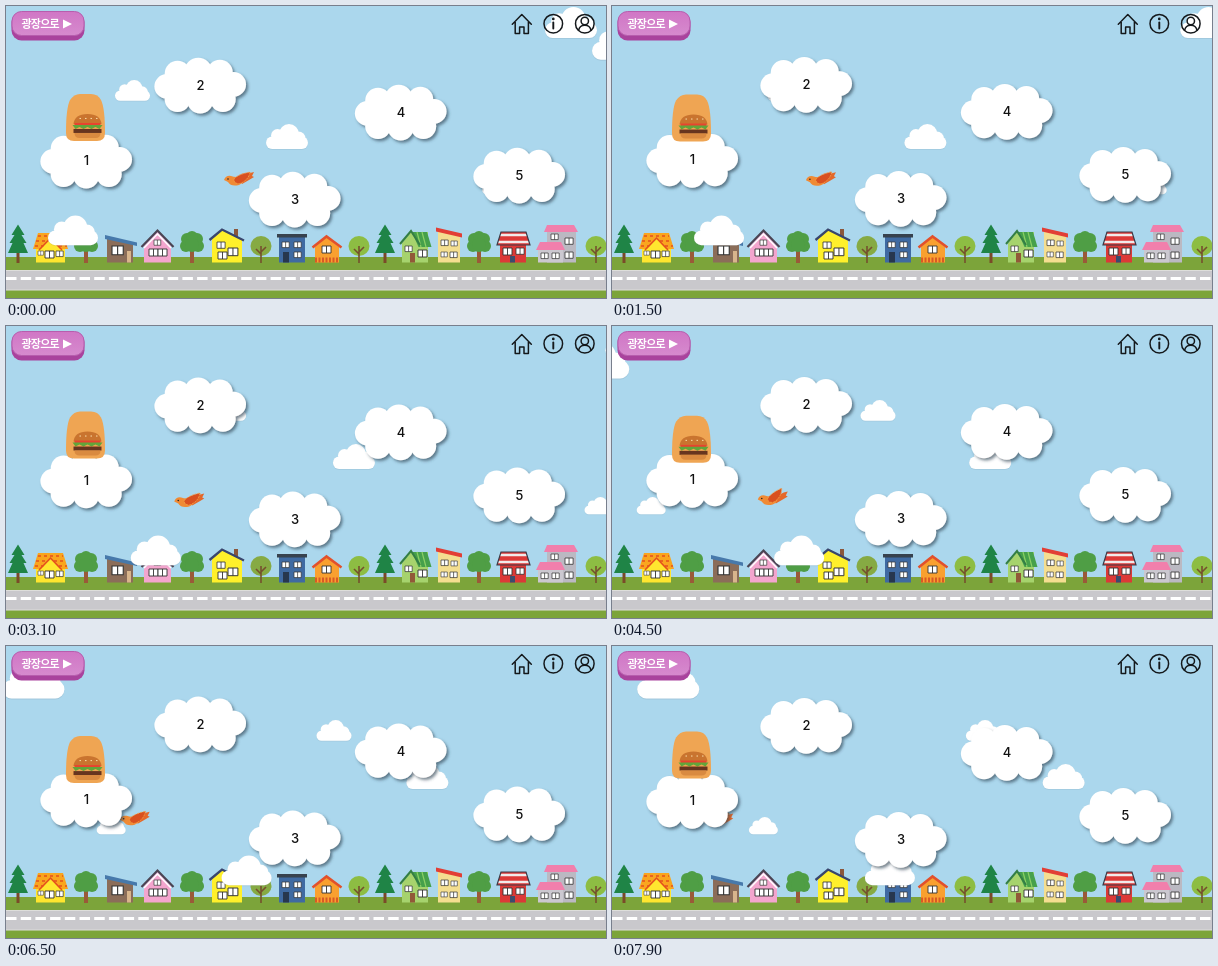
These frames come from a looping animation (600x292 px, 8000 ms). An HTML page:

```html
<!DOCTYPE html>
<html lang="ko">
<head>
<meta charset="utf-8">
<style>
html, body { margin: 0; width: 100%; height: 100%; overflow: hidden; background: #abd7ed; }
svg { display: block; width: 600px; height: 292px; }
text { font-family: "Noto Sans CJK KR", "Noto Sans CJK", sans-serif; }
#islands text { font: 500 13px Inter, sans-serif; }
</style>
</head>
<body>
<svg id="stage" viewBox="0 0 600 292">
  <defs>
    <linearGradient id="pink" x2="0" y2="1">
      <stop offset="0" stop-color="#d076c5"/><stop offset="1" stop-color="#d68ace"/>
    </linearGradient>
    <filter id="shade" x="-20%" y="-20%" width="150%" height="150%">
      <feDropShadow dx="2" dy="2.2" stdDeviation="1.7" flood-color="#345" flood-opacity=".65"/>
    </filter>
    <filter id="soft" x="-20%" y="-20%" width="150%" height="150%">
      <feDropShadow dx="0" dy=".4" stdDeviation=".5" flood-color="#678" flood-opacity=".3"/>
    </filter>
    <g id="cloud" fill="#fff">
      <rect y="12.5" width="42" height="12.5" rx="6.2"/>
      <circle cx="11.5" cy="11.5" r="6.5"/><circle cx="23" cy="10" r="10"/><circle cx="32.5" cy="14.5" r="7"/>
    </g>
    <g id="island" fill="#fff" transform="translate(-.3 .3) scale(.985)">
      <ellipse rx="36" ry="20"/>
      <circle cx="-23" cy="-12" r="13"/><circle cx="-2" cy="-14" r="14"/><circle cx="20" cy="-13" r="13"/>
      <circle cx="-34" cy="1" r="12.5"/><circle cx="34" cy="-1" r="12.5"/>
      <circle cx="-23" cy="14" r="13"/><circle cx="0" cy="15.5" r="13"/><circle cx="23" cy="14" r="13"/>
    </g>
    <path id="window" fill="#fff" stroke="#333" stroke-width=".9" d="M0 0h9v7h-9zM4.5 0v7"/>
  </defs>

  <g id="town"></g>
  <g id="clouds"></g>

  <g id="bird">
    <path fill="#e4682a" d="M1 0l10-5 4-1-2 4 2 1-5 3-7 4z"/>
    <path fill="#f08a34" d="M-15 2q2-5 7-4q5 2 12 0q3 6-4 9-8 2-11-3z"/>
    <path id="wing" fill="#d9501f" stroke="#f3a24a" stroke-width=".8" stroke-dasharray="2 1" d="M-5 1q3-5 15-9-1 9-9 13-6 1-6-4z"/>
    <circle cx="-11" cy="1" r=".8" fill="#222"/>
  </g>

  <g id="islands"></g>

  <g id="buddy">
    <path fill="#efa553" d="M60 128q0-25 4-33 4-6 10-6h11q7 0 10 6 4 8 4 33 0 8-8 8h-23q-8 0-8-8z"/>
    <g transform="translate(-.5 -1)">
      <path fill="#c9742f" d="M68 120q1-10 14-10t14 10z"/>
      <path fill="#e8432f" d="M69 119h26v3h-26z"/>
      <path fill="#62a53a" d="M67 121h30l-3 4-4-2-4 2-4-2-4 2-4-2-4 2z"/>
      <path fill="#67351f" d="M68 125h28v4h-28z"/>
      <path fill="#d98a40" d="M69 129h26q0 5-5 5h-16q-5 0-5-5z"/>
      <path stroke="#f8dda8" stroke-dasharray="1.5 4" d="M74 114.5h18"/>
    </g>
  </g>

  <rect x="5.5" y="6" width="73" height="28.5" rx="10" fill="#a9439d"/>
  <rect x="6" y="5.5" width="72" height="24" rx="9.5" fill="url(#pink)" stroke="#b75dad"/>
  <text x="15.5" y="21.8" font-size="11" font-weight="700" fill="#fff" letter-spacing="-.8">광장으로</text>
  <path fill="#fff" d="M57 13.5l9 4.5-9 4.5z"/>

  <g fill="none" stroke="#14181b" stroke-width="1.5" stroke-linejoin="round" stroke-linecap="round">
    <path d="M506.3 18.3l9.5-9.8 9.5 9.8M509.2 16v11.5h4.4v-6.5h4.4v6.5h4.4v-11.5"/>
    <circle cx="547.3" cy="17.7" r="9.3"/><path d="M547.3 16.5v6" stroke-width="1.9"/>
    <circle cx="547.3" cy="12.9" r=".6"/>
    <circle cx="578.8" cy="17.7" r="9.3"/><circle cx="578.8" cy="15" r="3.7"/>
    <path d="M572.6 24.3q1-5 6.2-5t6.2 5"/>
  </g>
</svg>
<script>
const $ = id => document.getElementById(id);
const shape = (fill, d) => `<path fill="${fill}" d="${d}"/>`;
const box = (fill, x, y, w, h) => `<rect x="${x}" y="${y}" width="${w}" height="${h}" fill="${fill}"/>`;
const win = (x, y, s = 1) => `<use href="#window" transform="translate(${x} ${y}) scale(${s})"/>`;
const dot = (fill, x, y, r) => `<circle cx="${x}" cy="${y}" r="${r}" fill="${fill}"/>`;
const line = (color, d, w = 2, dash = 'none') =>
  `<path fill="none" stroke="${color}" stroke-width="${w}" stroke-dasharray="${dash}" d="${d}"/>`;

const pine = x => box('#7a4a28', x - 1.5, 246, 3, 11) +
  shape('#1f8446', `M${x} 218.5l6.5 10.5h-3l5 8h-3l4.5 10h-20l4.5-10h-3l5-8h-3z`);
const bushy = x => box('#9a5a38', x - 2, 243, 4, 14) +
  [[-6, 240, 6], [6, 240, 6], [-5, 233, 6], [5, 233, 6], [0, 231, 6], [0, 239, 7]]
    .map(([dx, y, r]) => dot('#4f9e45', x + dx, y, r)).join('');
const round = (x, color) => `<ellipse cx="${x}" cy="240" rx="10.5" ry="10" fill="${color}"/>` +
  line('#75502d', `M${x} 257v-17m0 8l-5-5m5 3l5-5`, 1.6);

const houses = [
  // Yellow cottage with a dormer in its tiled roof
  box('#ffe62f', 30, 240, 29, 16.5) + shape('#f9a51f', 'M32 227h25l5 16h-35z') +
    line('#e4501e', 'M32 230h25M30 235h29M29 240h32', 1.5, '3 3') +
    shape('#ffe62f', 'M34 244l10.5-11 10.5 11z') + line('#e4501e', 'M33 244l11.5-12 11.5 12', 1.5) +
    win(39, 245) + win(50, 245, .8) + win(32, 245, .6),
  // Brown house under a slanting roof
  shape('#8b6d59', 'M101 232l26 6v18.5h-26z') + shape('#4779ab', 'M99 229l32 7.5v3.5l-32-7z') +
    win(106, 240, 1.25) + box('#d8b58c', 121, 245, 4, 11.5),
  // Pink gable
  shape('#f4a5ce', 'M138 240l13.5-14 13.5 14v16.5h-27z') + line('#fff', 'M138 242l13.5-14 13.5 14', 1.5) +
    line('#4b4453', 'M135.5 241l16-16.5 16 16.5', 2.2) +
    win(148, 234, .75) + win(143, 243) + win(152, 243),
  // Yellow gable with chimney
  box('#8b573c', 228, 223, 4, 9) + shape('#fff02b', 'M206 233l10-9 20 10v22.5h-30z') +
    line('#39466d', 'M203.5 234l12.5-10.5 22 11', 2.3) + win(211, 236, .9) + win(212, 246) + win(222, 242, 1.1),
  // Blue block
  box('#3f6aa2', 273, 231, 26, 25.5) + box('#37424e', 271, 228, 30, 3.5) +
    win(276, 236, .8) + win(288, 236, .8) + win(288, 246, .8) + box('#27374e', 277, 246, 6, 10.5),
  // Orange gable with a fence
  shape('#f9a02f', 'M309 241l11.5-10 12.5 10v15.5h-24z') + line('#e2502b', 'M306.5 241.5l14-11 15 11', 2.6) +
    win(316, 240) + line('#d95a25', 'M309 254h24', 5, '2 1.5'),
  // Green house with a gable beside a striped roof
  shape('#a6d36d', 'M396 237l9-11h17v30.5h-26z') + shape('#46a04b', 'M406 226h15l4.5 15h-13z') +
    line('#8ccf65', 'M411 226l4 15m1-15l4 15', 1.2) + line('#347e45', 'M394 238l11-13 9 14', 2) +
    win(399, 240, .8) + win(412, 244) + box('#915938', 404, 247, 5, 9.5),
  // Pale house with a red slanting roof
  shape('#f4de90', 'M432 225l22 5v26.5h-22z') + shape('#e23e35', 'M430 221.5l26 6v4l-26-6z') +
    win(435, 234, .8) + win(445, 235, .7) + win(444, 246, .8) + win(435, 246, .7),
  // Red house with a striped roof
  box('#dc3937', 494, 238, 26, 18.5) + shape('#dc3937', 'M495 226h25l4 13h-33z') +
    line('#f1eaea', 'M494 229h27M492 236h31', 2.6) + line('#3b3b48', 'M491 239l4-13h25l4 13z', 1.2) +
    win(497, 242) + win(510, 242, .9) + box('#3c4c6c', 504, 250, 5, 6.5),
  // Grey house with two pink roofs
  box('#bbb9c2', 541, 225, 29, 31.5) + box('#cbc8d0', 532, 243, 25, 13.5) +
    shape('#f17fac', 'M541 219h27l4 7h-34zM534 236h21l4 8h-29z') +
    win(545, 228, .8) + win(559, 232, .9) + win(535, 247, .8) + win(546, 247, .8) + win(559, 246, .9),
];

const olive = '#86aa43', lime = '#8dbd43';
$('town').innerHTML =
  box('#abd7ed', 0, 0, 600, 292) + box('#7ca43a', 0, 251, 600, 41) +
  box('#dededb', 0, 264, 600, 20.5) + box('#c9c8cc', 0, 265, 600, 18.5) +
  line('#fff', 'M0 272.5H600', 3, '10.5 4.2') +
  [12, 379].map(pine).join('') + [80, 186, 473].map(bushy).join('') +
  round(255, olive) + round(353, lime) + round(590, lime) + houses.join('');

// Drifting clouds: left edge at start, pixels per second, top, width, wraps at the right edge
const clouds = [
  [109, 31, 74, 35], [260, 21.6, 118, 42], [42, 26.7, 209.5, 50],
  [539, 19.5, 1, 52], [586, 20.6, 18, 60], [-137.5, 20.6, 15.5, 62], [476.2, 33, 171, 29, true],
];
$('clouds').innerHTML = clouds.map(() => '<use href="#cloud" filter="url(#soft)"/>').join('');

const spots = [[80.5, 153], [194.5, 78], [289, 192], [395, 105], [513.5, 168]];
$('islands').innerHTML = spots.map(([x, y], i) =>
  `<g transform="translate(${x} ${y})"><use href="#island" filter="url(#shade)"/>` +
  `<text y="4.7" text-anchor="middle" fill="#111">${i + 1}</text></g>`).join('');

const wave = (t, period, peak) => Math.cos((t - peak) / period * 2 * Math.PI);
const move = (el, x, y, more = '') => el.setAttribute('transform', `translate(${x} ${y}) ${more}`);

function draw(now) {
  const t = Math.floor(now % 8000 / 100) / 10;
  clouds.forEach(([x, speed, y, w, wraps], i) => {
    const left = x + speed * t;
    move($('clouds').children[i], wraps ? left % 600 : left, y, `scale(${w / 42})`);
  });
  move($('islands'), 0, 0.7 + 1.3 * wave(t, 3, 2.4));
  move($('buddy'), 0, -1.2 + 2.3 * wave(t, 0.96, 0.73));
  move($('bird'), 233 - 16.05 * t, 172.5 + wave(t, 2.4, 0.8));
  $('wing').setAttribute('transform', `rotate(${8 * wave(t, 0.8, 0)} -4 2)`);
  requestAnimationFrame(draw);
}
requestAnimationFrame(draw);
</script>
</body>
</html>
```
